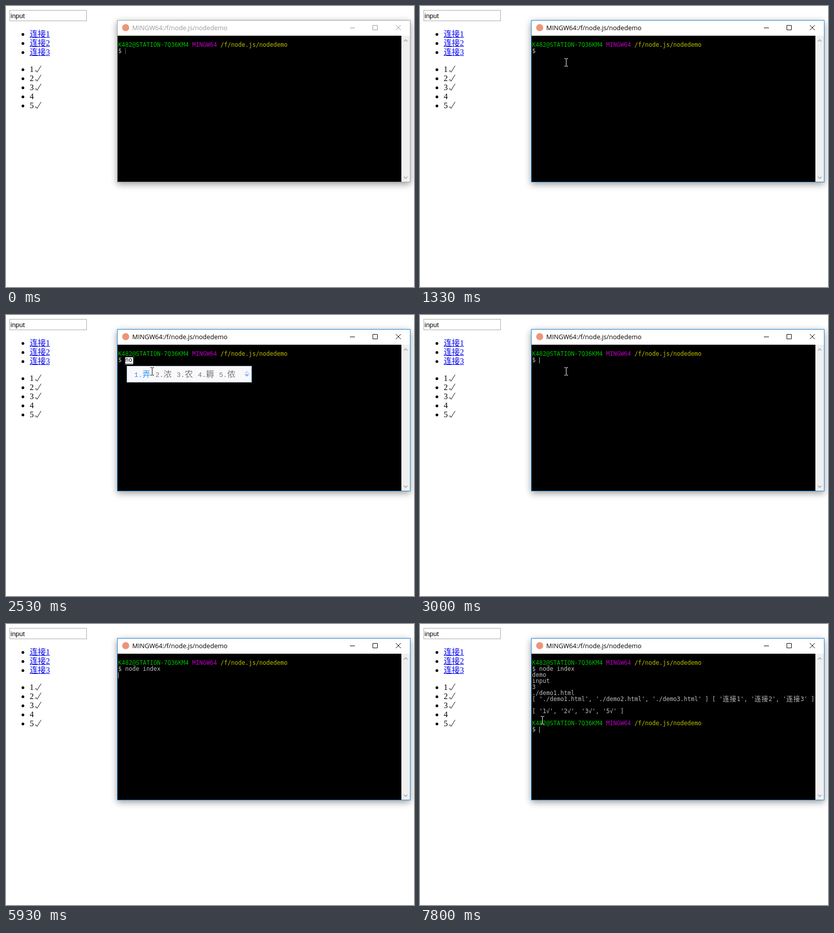
Write an HTML page that moves like this. It is 808 px wide and 558 px high and loops after 8 s.

```html
<!DOCTYPE html>
<html lang="zh">
<head>
<meta charset="utf-8">
<title>Terminal session</title>
<style>
html, body { margin: 0; width: 100%; height: 100%; overflow: hidden; background: #fff; }
svg { display: block; width: 808px; height: 558px; }
text { white-space: pre; }
.page { font: 16px "Liberation Serif", "Noto Sans CJK SC", "Noto Sans CJK", serif; }
.link { fill: #00e; }
.field { font: 13px "Liberation Sans", sans-serif; }
.title { font: 12.65px "Open Sans", "Noto Sans", sans-serif; }
.term { font: 11.627px "DejaVu Sans Mono", monospace; fill: #bfbfbf; }
.han { font-family: "Noto Sans CJK SC", "Noto Sans CJK", sans-serif; font-size: 13px; letter-spacing: 1px; }
.user { fill: #00bf00; }
.sys { fill: #bf00bf; }
.dir { fill: #bfbf00; }
.number { font: 13.33px "Liberation Mono", monospace; }
.option { font: 16px "Noto Sans CJK SC", "Noto Sans CJK", sans-serif; font-weight: 300; }
#ibeam { mix-blend-mode: difference; }
#shade { filter: drop-shadow(0 4px 7px rgba(0,0,0,.4)); }
</style>
</head>
<body>
<svg id="stage" viewBox="0 0 808 558" xmlns="http://www.w3.org/2000/svg">
  <rect width="808" height="558" fill="#fff"/>
  <rect x="7.5" y="8.5" width="152" height="21" fill="#fff" stroke="#a9a9a9"/>
  <text class="field" x="9" y="24">input</text>
  <g id="lists" class="page"></g>

  <rect id="shade" x="220" y="28" width="581" height="322" fill="#fff"/>
  <rect id="frame" x="220.5" y="28.5" width="580" height="321" fill="#fff"/>
  <circle cx="237" cy="43" r="7" fill="#ee9478"/>
  <text id="title" class="title" x="250" y="48">MINGW64:/f/node.js/nodedemo</text>
  <path id="buttons" d="M681 43.5h10M726.5 38.5h9v9h-9zM772 38l10 10M782 38l-10 10" fill="none"/>
  <rect x="221" y="59" width="562" height="290"/>
  <rect x="783" y="59" width="17" height="290" fill="#f0f0f0"/>
  <path d="M788 70.5l3.5-3.5 3.5 3.5M788 339l3.5 3.5 3.5-3.5" fill="none" stroke="#b4b4b4" stroke-width="1.8"/>

  <g class="term">
    <g id="lines"></g>
    <text id="typed" x="236" y="93"></text>
  </g>
  <line id="caret" stroke="#bfbfbf"/>

  <g id="ime">
    <rect id="mark" x="236" y="84" height="14" fill="#fff"/>
    <text id="pinyin" class="term" x="236" y="93" style="fill:#000"></text>
    <path id="dots" stroke="#000" stroke-dasharray="2 1"/>
    <rect id="panel" x="239.5" y="101.5" height="32" fill="#f9f8fb" stroke="#a9b4c8"/>
    <path id="edge" stroke="#4b8fdc"/>
    <g id="options"></g>
    <g id="pager">
      <path d="M0 5h10l-5-5z" fill="#c9def7"/>
      <path d="M0 7h10l-5 5z" fill="#86b7f2"/>
    </g>
  </g>

  <path id="arrow" d="M.5 .5v16l3.8-3.5 2.6 5.6 2.4-1.1-2.6-5.4h5z" fill="#fff" stroke="#000"/>
  <path id="ibeam" d="M-3.5 -7.5h3M.5 -7.5h3M0 -7v14M-3.5 7.5h3M.5 7.5h3" stroke="#fff"/>
</svg>
<script>
const LOOP = 8000, TICK = 1000 / 15, CELL = 7;
const FOCUS = 800, ENTER = 5930, OUTPUT = 6400, DONE = 6530;
const $ = id => document.getElementById(id);
const show = (id, on) => { $(id).style.display = on ? '' : 'none'; };
const set = (id, attrs) => {
  for (const name in attrs) $(id).setAttribute(name, attrs[name]);
};
const rowTop = row => 60 + 12 * row;

// Page lists
const bullet = y => `<circle cx="33.5" cy="${y + .5}" r="2.7"/>`;
let items = '';
for (let i = 0; i < 3; i++) {
  const y = 56 + 18 * i;
  items += bullet(y) + `<text class="link" x="47" y="${y + 5}">连接${i + 1}</text>` +
    `<path d="M47 ${y + 6.5}h40" stroke="#00e"/>`;
}
for (let i = 0; i < 5; i++) {
  const y = 126 + 18 * i;
  items += bullet(y) + `<text x="47" y="${y + 5}">${i + 1}</text>`;
  if (i !== 3) {
    items += `<path d="M57.5 ${y + 3.5}l2-1.5 2 3.5 8-13" fill="none" stroke="#000"/>`;
  }
}
$('lists').innerHTML = items;

// Terminal lines: [row, time of appearance, content]
const prompt = '<tspan class="user">K482@STATION-7Q36KM4</tspan> ' +
  '<tspan class="sys">MINGW64</tspan> <tspan class="dir">/f/node.js/nodedemo</tspan>';
const quoted = (list, wrap) => `[ ${list.map(n => `'${wrap(n)}'`).join(', ')} ]`;
const files = quoted([1, 2, 3], n => `./demo${n}.html`);
const links = quoted([1, 2, 3], n => `<tspan class="han">连接</tspan>${n}`);
const lines = [
  [1, 0, prompt], [2, 0, '$'],
  [3, OUTPUT, 'demo'], [4, OUTPUT, 'input'], [5, OUTPUT, '3'], [6, OUTPUT, './demo1.html'],
  [7, OUTPUT, files + ' ' + links], [9, OUTPUT, quoted([1, 2, 3, 5], n => n + '√')],
  [11, DONE, prompt], [12, DONE, '$']
];
$('lines').innerHTML = lines.map(([row, , content]) =>
  `<text x="222" y="${rowTop(row) + 9}">${content}</text>`).join('');

// Timelines: [start, value]
const typing = [
  [0, ''], [3070, 'n'], [3530, 'no'], [3800, 'nod'], [3870, 'node'], [4330, 'node '],
  [4530, 'node i'], [4670, 'node in'], [4870, 'node ind'], [5000, 'node inde'], [5200, 'node index']
];
const composing = [
  [0, ''], [1930, 'n'], [2130, 'nod'], [2400, 'node'], [2470, 'nod'], [2530, 'no'], [2670, 'n'], [2930, '']
];
const caretOn = [
  [0, 1], [1330, 0], [3000, 1], [5730, 0], [ENTER, 1], [7070, 0], [7600, 1]
];
const choices = {
  n: ['你', '年', '能', '那', '呢'],
  no: ['弄', '浓', '农', '耨', '侬'],
  nod: ['弄的', '弄', '浓', '农', '耨'],
  node: ['弄得', '弄', '浓', '农', '耨']
};
const valueAt = (timeline, t) => timeline.filter(([start]) => start <= t).pop()[1];

function drawIme(text) {
  show('ime', text);
  if (!text) return;
  const width = CELL * text.length + 2;
  set('mark', { width });
  $('pinyin').textContent = text;
  set('dots', { d: `M236 96.5h${width}` });
  let x = 254;
  $('options').innerHTML = choices[text].map((word, i) => {
    const left = x;
    x += 26 + 16 * word.length;
    return `<g fill="${i ? '#777' : '#2f94f5'}"><text class="number" x="${left}" y="123">${i + 1}.</text>` +
      `<text class="option" x="${left + 16}" y="123">${word}</text></g>`;
  }).join('');
  const right = x + 23;
  set('panel', { width: right - 240 });
  set('edge', { d: `M${right - .5} 101v33` });
  set('pager', { transform: `translate(${right - 15} 110.5)` });
}

function drawCaret(t, text) {
  let x = 236 + CELL * text.length, row = 2;
  if (t >= DONE) { x = 236; row = 12; }
  else if (t >= OUTPUT) { x = 222; row = 10; }
  else if (t >= ENTER) { x = 222; row = 3; }
  const y = rowTop(row);
  show('caret', valueAt(caretOn, t));
  set('caret', {
    x1: x + .5, x2: x + .5, y1: y, y2: y + 12,
    'stroke-dasharray': t < FOCUS ? '1 1' : 'none'
  });
}

function pointerAt(t) {
  const glide = (from, to, start, steps) => {
    const tick = Math.floor((t - start + 4) / TICK);
    const left = 1 - Math.min(1, Math.max(0, tick / steps));
    const p = 1 - left * left;
    return from.map((v, i) => Math.round(v + (to[i] - v) * p));
  };
  if (t >= 200 && t < 3600) return glide([145, 348], [289, 112], 200, 7);
  if (t >= 7600) return glide([95, 171], [242, 191], 7600, 3);
  return null;
}

function drawPointer(t) {
  const at = pointerAt(t);
  const inTerm = at && at[0] > 220 && at[0] < 783 && at[1] > 58 && at[1] < 349;
  show('arrow', at && !inTerm);
  show('ibeam', inTerm);
  if (!at) return;
  const [x, y] = at;
  set('arrow', { transform: `translate(${x} ${y})` });
  set('ibeam', { transform: `translate(${x + .5} ${y})` });
}

function draw(t) {
  const active = t >= FOCUS;
  set('frame', { stroke: active ? '#1883d7' : '#a0a0a0' });
  set('title', { fill: active ? '#000' : '#999' });
  set('buttons', { stroke: active ? '#000' : '#999' });
  lines.forEach(([, start], i) => {
    $('lines').children[i].style.display = t >= start ? '' : 'none';
  });
  const text = valueAt(typing, t);
  $('typed').textContent = text;
  drawCaret(t, text);
  drawIme(valueAt(composing, t));
  drawPointer(t);
}

const begin = performance.now();
function tick() {
  draw((performance.now() - begin) % LOOP);
  requestAnimationFrame(tick);
}
tick();
</script>
</body>
</html>
```
